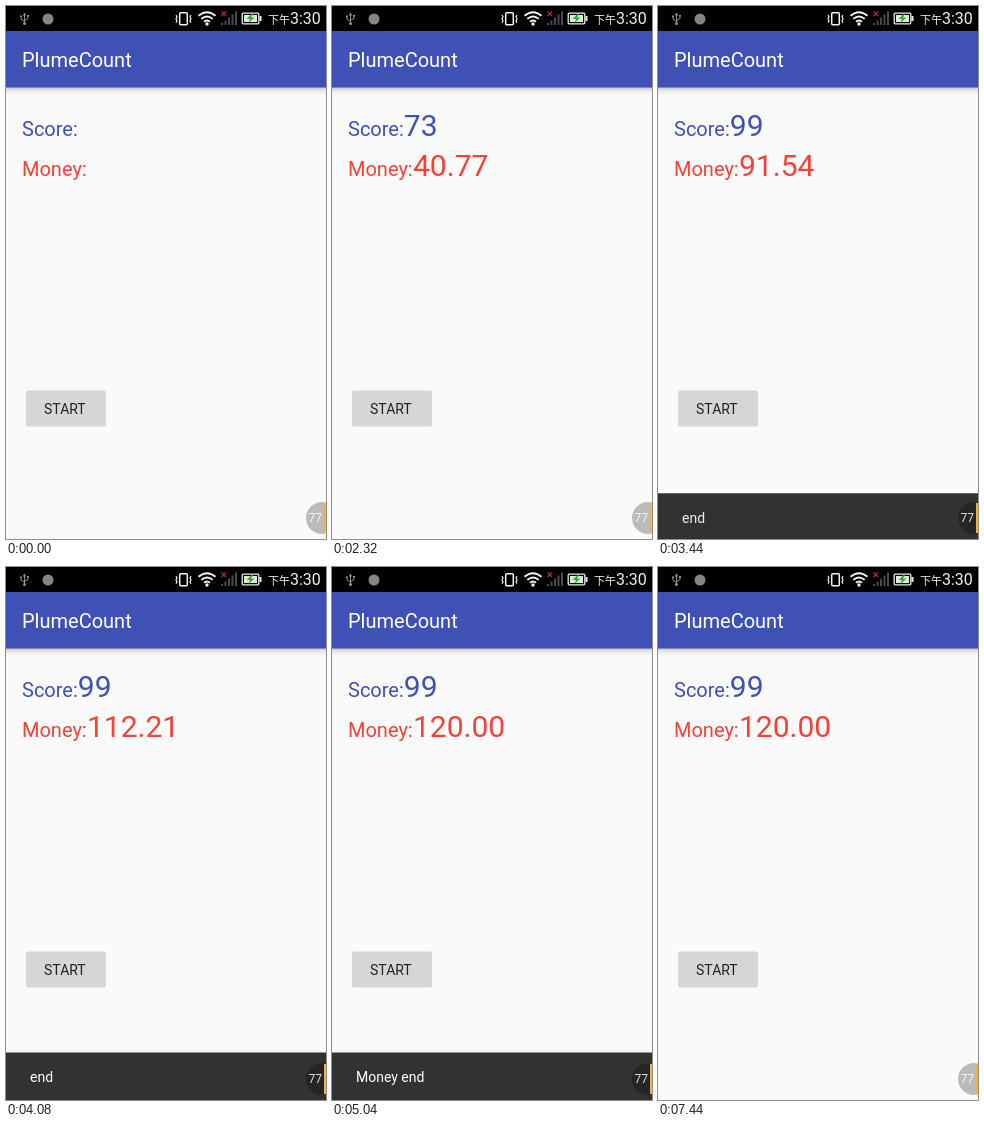
These frames come from a looping animation (320 by 533 pixels, 7.84 s). An HTML page:

```html
<!DOCTYPE html>
<html lang="en">
<head>
<meta charset="utf-8">
<title>Counter</title>
<style>
  html, body { margin: 0; width: 100%; height: 100%; overflow: hidden; background: #fafafa; }
  svg { display: block; width: 100%; height: 100%; }
  text { font-family: Roboto, sans-serif; font-size: 20px; }
  .num { font-size: 30px; }
  .small { font-size: 14px; }
</style>
</head>
<body>
<svg viewBox="0 0 320 533">
  <defs>
    <linearGradient id="shade" x2="0" y2="1">
      <stop stop-color="#000" stop-opacity=".24"/>
      <stop offset=".4" stop-color="#000" stop-opacity=".08"/>
      <stop offset="1" stop-color="#000" stop-opacity="0"/>
    </linearGradient>
  </defs>
  <rect width="320" height="533" fill="#fafafa"/>
  <rect y="81" width="320" height="8" fill="url(#shade)"/>
  <rect y="25" width="320" height="56.5" fill="#3f51b5"/>
  <rect width="320" height="25" fill="#000"/>

  <!-- status icons -->
  <g fill="none" stroke="#929292" stroke-width="1">
    <path d="M18.500 8V17M15 10.500V13L18.500 15.500M22 10V12.500L18.500 14.500"/>
    <path d="M16.800 9.500L18.500 6.500L20.200 9.500ZM14 9.500h2v1.600h-2ZM21 9h2v1.600h-2Z" fill="#929292" stroke="none"/>
    <circle cx="18.500" cy="17.500" r="1.500" fill="#929292" stroke="none"/>
  </g>
  <circle cx="42" cy="13" r="5.500" fill="#858585"/>
  <g fill="none" stroke="#f2f2f2">
    <rect x="173.700" y="6.700" width="7.600" height="12.100" rx="1" stroke-width="1.500"/>
    <path d="M170 9l1 1.800-1 2 1 2-1 1.800M185 9l-1 1.800 1 2-1 2 1 1.800" stroke-width="1.200"/>
    <path d="M192.500 9.800Q201 2.500 209.500 9.800M195.300 12.900Q201 7.900 206.700 12.900M198 15.800Q201 13.200 204 15.800" stroke-width="1.900"/>
  </g>
  <circle cx="201" cy="18" r="1.700" fill="#f2f2f2"/>
  <path d="M215 17h2v2h-2zM218.500 14.500h2V19h-2zM222 11.500h2V19h-2zM225.500 8.500h2V19h-2zM229 5.500h2V19h-2z" fill="#4b4b4b"/>
  <path d="M215.500 5.500l4.500 4.500m0-4.500l-4.500 4.500" stroke="#b4262c" stroke-width="1.300"/>
  <rect x="236.200" y="7.200" width="16.600" height="10.600" rx="1" fill="#000" stroke="#ededed" stroke-width="1.300"/>
  <rect x="253.500" y="10" width="2" height="5" fill="#ededed"/>
  <rect x="238" y="9" width="13" height="7" fill="#d9eed5"/>
  <path d="M245.500 8l-5 5h3.500l-1.500 4 6-5.500h-3.500l2-3.500z" fill="#36a637"/>
  <text x="262" y="18" fill="#f0f0f0" style="font:11px 'Noto Sans CJK SC','Noto Sans CJK',sans-serif">下午</text>
  <text x="284" y="18" fill="#f0f0f0" style="font-size:16px">3:30</text>

  <text x="16" y="61" fill="#fff">PlumeCount</text>
  <g fill="#3f51b5">
    <text x="16" y="129.500">Score:</text>
    <text id="score" class="num" x="71.800" y="129.500"></text>
  </g>
  <g fill="#f44336">
    <text x="16" y="170">Money:</text>
    <text id="money" class="num" x="81" y="170"></text>
  </g>

  <rect x="20" y="384.500" width="80" height="36" rx="2" fill="#d5d6d6"/>
  <text class="small" x="38" y="408" fill="#212121">START</text>

  <g id="bar">
    <rect y="485.500" width="320" height="48" fill="#323232"/>
    <text id="note" class="small" x="24" y="515" fill="#fff"></text>
  </g>

  <circle cx="316" cy="512" r="16" fill="#000" fill-opacity=".25"/>
  <text x="302.500" y="516" fill="#fff" fill-opacity=".85" style="font-size:12px">77</text>
  <rect x="318" y="497" width="2" height="30" fill="#f3b43c"/>
</svg>
<script>
const LOOP = 7840, STEP = 80, BAR = 48;
const START = 735, SCORE_MS = 2400;
// [time, amount] anchors of one cosine ease from 0 to 120
const marks = [[START, 0], [1440, 8.97], [2320, 40.77], [2960, 70.57], [4080, 112.21], [4735, 120]];
// [text, show start, show length, hide start, hide length]
const notes = [
  ["end", 3135, 400, 4720, 160],
  ["Money end", 4880, 160, 7020, 400]
];
const el = id => document.getElementById(id);
const clamp = x => Math.min(1, Math.max(0, x));
const cosEase = x => (1 - Math.cos(Math.PI * x)) / 2;

// cubic-bezier(.4, 0, .2, 1)
function ease(x) {
  let lo = 0, hi = 1;
  for (let i = 0; i < 20; i++) {
    const u = (lo + hi) / 2, v = 1 - u;
    if (1.2 * v * v * u + 0.6 * v * u * u + u * u * u < x) lo = u; else hi = u;
  }
  return lo * lo * (3 - 2 * lo);
}

function moneyAt(t) {
  const i = marks.findIndex(m => m[0] > t);
  if (i < 0) return 120;
  const [[t0, a], [t1, b]] = [marks[i - 1], marks[i]];
  const angle = v => Math.acos(1 - v / 60);
  const k = (t - t0) / (t1 - t0);
  return 60 * (1 - Math.cos(angle(a) + k * (angle(b) - angle(a))));
}

function drawBar(t) {
  const n = notes.find(n => t >= n[1] && t < n[3] + n[4]);
  el("bar").style.display = n ? "" : "none";
  if (!n) return;
  const [text, inAt, inMs, outAt, outMs] = n;
  const show = clamp((t - inAt) / inMs), hide = clamp((t - outAt) / outMs);
  const y = BAR * (1 - ease(show) + ease(hide));
  el("bar").setAttribute("transform", `translate(0 ${y.toFixed(2)})`);
  el("note").textContent = text;
  el("note").setAttribute("opacity", ease(clamp((show - .28) / .72)) * (1 - ease(clamp(hide / .72))));
}

function draw(t) {
  const on = t >= START;
  el("score").textContent = on ? 1 + Math.floor(98 * cosEase(clamp((t - START) / SCORE_MS))) : "";
  el("money").textContent = on ? moneyAt(t).toFixed(2) : "";
  drawBar(t);
}

let origin;
function tick(now) {
  origin ??= now;
  const t = (now - origin) % LOOP;
  draw(t - t % STEP);
  requestAnimationFrame(tick);
}
draw(0);
requestAnimationFrame(tick);
</script>
</body>
</html>
```
